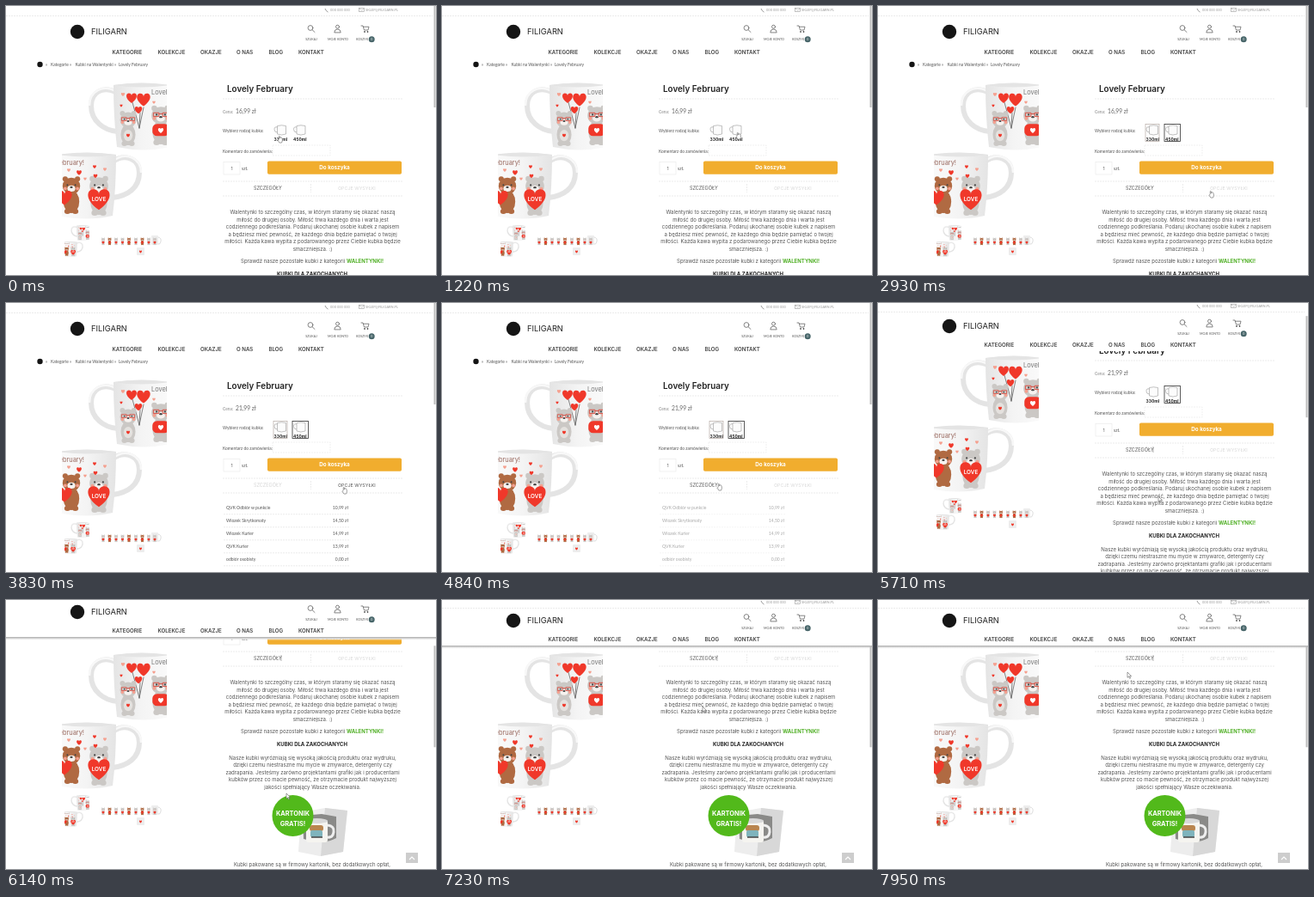
An HTML page that plays this animation: 500x313 px, repeating every 8 s.

```html
<!DOCTYPE html>
<html lang="pl">
<head>
<meta charset="utf-8">
<title>Sklep z kubkami</title>
<style>
html, body { margin: 0; width: 100%; height: 100%; overflow: hidden; background: #fff; }
svg { display: block; width: 500px; height: 313px; font-family: Inter, "Open Sans", sans-serif; }
.lato { font-family: Lato, "Open Sans", sans-serif; }
.dash { stroke: #e2e2e2; stroke-width: .7; stroke-dasharray: 2 1; }
.line { fill: none; stroke: #666; stroke-width: .8; stroke-linecap: round; stroke-linejoin: round; }
</style>
</head>
<body>
<svg id="stage" viewBox="0 0 500 313" xmlns="http://www.w3.org/2000/svg"></svg>
<script>
const LOOP = 8000;

// ---- drawing helpers ----
const text = (x, y, size, str, { fill = '#555', weight = 400, anchor = 'start', cls = '', id = '' } = {}) =>
  `<text x="${x}" y="${y}" font-size="${size}" fill="${fill}" font-weight="${weight}" text-anchor="${anchor}" class="${cls}" id="${id}">${str}</text>`;
const lato = (x, y, size, str, opts = {}) => text(x, y, size, str, { cls: 'lato', ...opts });
const mid = (x, y, size, str, opts = {}) => text(x, y, size, str, { anchor: 'middle', ...opts });
const rect = (x, y, w, h, fill, extra = '') => `<rect x="${x}" y="${y}" width="${w}" height="${h}" fill="${fill}" ${extra}/>`;
const dot = (x, y, r, fill) => `<circle cx="${x}" cy="${y}" r="${r}" fill="${fill}"/>`;
const oval = (x, y, rx, ry, fill) => `<ellipse cx="${x}" cy="${y}" rx="${rx}" ry="${ry}" fill="${fill}"/>`;
const path = (d, extra = 'class="line"') => `<path d="${d}" ${extra}/>`;
const dash = (x1, x2, y) => path(`M${x1} ${y}H${x2}`, 'class="dash"');
const group = (id, body, extra = '') => `<g id="${id}" ${extra}>${body}</g>`;

const RED = '#f0382a', PINK = '#f5a08f', GREY = '#cbc8c5', BROWN = '#b06a42';
const heart = (x, y, s, fill = RED) => path(
  'M0 .95C-1.35 0-1.05-.9-.5-.9C-.2-.9 0-.7 0-.45C0-.7 .2-.9 .5-.9C1.05-.9 1.35 0 0 .95Z',
  `fill="${fill}" transform="translate(${x} ${y}) scale(${s})"`);

// Bear standing on y = 0, about 44 units tall.
const bear = (x, y, s, fill, extra = '') => `<g transform="translate(${x} ${y}) scale(${s})">
  ${dot(-7, -39, 3, fill)}${dot(7, -39, 3, fill)}
  ${oval(-4.5, -2, 3.5, 3, fill)}${oval(4.5, -2, 3.5, 3, fill)}
  ${oval(0, -13, 9, 13, fill)}${oval(0, -31, 10, 9.5, fill)}
  ${oval(0, -28, 4.5, 3.5, '#f6f2ef')}${oval(0, -29.5, 1.6, 1.1, '#444')}
  ${dot(-4.5, -32, 1, '#444')}${dot(4.5, -32, 1, '#444')}
  ${dot(-7, -28, 1.8, PINK)}${dot(7, -28, 1.8, PINK)}${extra}</g>`;
const glasses = path('M-8-34h6v4h-6zM2-34h6v4H2zM-2-33H2', 'fill="none" stroke="#d94f43" stroke-width=".9"');

// ---- pieces ----
const mugs = () => group('mugs', `
  ${path('M129 101C112 92 99 101 99 116C99 134 114 145 130 146', 'fill="none" stroke="#e4e4e4" stroke-width="6"')}
  ${path('M129 100C112 90 97 100 97 116', 'fill="none" stroke="#f8f8f8" stroke-width="2.5"')}
  <g clip-path="url(#clipA)">
    ${path('M125 92Q157 87 190 92V164Q160 171 129 164Q125 130 125 92Z', 'fill="url(#shadeA)"')}
    ${path('M125 92Q157 87 190 92Q157 97 125 92Z', 'fill="#e4e4e4"')}
    ${text(169, 103, 7.4, 'Lovely', { fill: '#777' })}
    ${path('M155 142L147 112M155 142L160 118M155 142L156 124', 'class="line" stroke-width=".4"')}
    ${heart(146, 107, 6.2)}${heart(160, 109, 8)}${heart(154, 121, 4.5)}
    ${heart(136, 103, 2.2, PINK)}${heart(172, 112, 1.8, PINK)}${heart(134, 116, 1.6)}
    ${bear(142, 162, .95, GREY, glasses + oval(0, -12, 5.5, 7, '#e4e1de') + heart(0, -12, 2.2))}
    ${bear(180, 161, 1.08, GREY, glasses + rect(-9, -22, 18, 13, RED, 'rx="5"') + heart(0, -15, 3, '#fff'))}
  </g>
  ${path('M124 181C139 171 155 178 155 194C155 212 141 221 124 223', 'fill="none" stroke="#e4e4e4" stroke-width="6"')}
  ${path('M125 180C140 169 157 177 157 194', 'fill="none" stroke="#f8f8f8" stroke-width="2.5"')}
  <g clip-path="url(#clipB)">
    ${path('M60 173Q94 168 128 173Q128 212 124 244Q94 251 60 244Z', 'fill="url(#shadeB)"')}
    ${path('M60 173Q94 168 128 173Q94 178 60 173Z', 'fill="#e4e4e4"')}
    ${text(91, 185, 7.4, 'February!', { fill: '#9a6a60', anchor: 'end' })}
    ${heart(85, 194, 3)}${heart(73, 191, 2, PINK)}${heart(103, 187, 2)}${heart(115, 190, 2, PINK)}${heart(92, 201, 1.8, PINK)}
    ${bear(76, 241, 1.02, BROWN)}${heart(68, 223, 9)}
    ${bear(108, 243, 1.08, GREY)}${heart(104, 198, 2.4)}
    ${heart(108, 225, 13)}${mid(108, 227, 6.4, 'LOVE', { fill: '#fff', weight: 600 })}
  </g>`);

const strip = (x, y, n) => Array.from({ length: n }, (_, i) =>
  bear(x + i * 7.5, y, .2, i % 3 === 1 ? BROWN : GREY, heart(0, -14, 8))).join('');

const gallery = () => group('gallery', `${mugs()}
  <use href="#mugs" transform="translate(68 255) scale(.235) translate(-65 -90)"/>
  ${strip(113, 278, 5)}${strip(151, 278, 3)}
  ${rect(169, 267, 8, 11, '#ededed', 'rx="1"')}${path('M177 269q4 1 3 5t-3 3', 'fill="none" stroke="#ddd"')}
  ${bear(173, 278, .2, GREY, heart(0, -14, 8))}
  ${rect(152, 281, 9, 9, '#ededed', 'rx="1"')}${heart(156.5, 286, 1.6)}`);

const sizeIcon = (x, label) =>
  path(`M${x + 5} 139.5Q${x + 10} 138 ${x + 15} 139.5V149Q${x + 10} 151 ${x + 5} 149ZM${x + 5} 141Q${x + 1.5} 140 ${x + 1.5} 143.5T${x + 5} 147`,
    'fill="#fcfcfc" stroke="#999" stroke-width=".6"') +
  mid(x + 8.8, 157.2, 4.9, label, { fill: '#222', weight: 700 });

const product = () => `
  ${dot(39.5, 68, 3.2, '#151515')}
  ${lato(46, 70, 4.8, '»')}${lato(52, 70, 4.9, 'Kategorie »')}
  ${lato(80.5, 70, 4.9, 'Kubki na Walentynki »')}${lato(131, 70, 4.9, 'Lovely February')}
  ${text(257, 99.5, 9.9, 'Lovely February', { fill: '#222', weight: 600 })}
  ${dash(252, 461, 108)}
  ${lato(252, 125, 4.9, 'Cena:', { fill: '#888' })}${lato(267, 125.3, 6.7, '', { id: 'price', fill: '#666' })}
  ${lato(252, 146.5, 4.9, 'Wybierz rodzaj kubka:')}
  ${sizeIcon(310.5, '330ml')}${sizeIcon(333, '450ml')}
  ${rect(311, 137.5, 16, 20, 'none', 'id="box330" stroke="#b5aaa4" stroke-width=".7"')}
  ${rect(333, 137.5, 18.5, 20, 'none', 'id="box450" stroke="#333" stroke-width=".8"')}
  ${lato(252, 170.5, 4.9, 'Komentarz do zamówienia:')}
  ${rect(310, 162, 67, 12, 'none', 'class="dash" opacity=".7"')}
  ${rect(253, 181.5, 19, 14.5, '#fff', 'stroke="#e8e8e8" stroke-width=".6"')}
  ${mid(262.5, 190.8, 5.2, '1')}${lato(274, 190.6, 5, 'szt.')}
  ${rect(304, 180.5, 156, 15.2, '#f1ad2e', 'rx="1.8"')}
  ${mid(382, 190.4, 6.3, 'Do koszyka', { fill: '#fff', weight: 700 })}
  ${text(288, 214, 5.5, 'SZCZEGÓŁY', { id: 'tabInfo' })}${text(386, 214, 5.4, 'OPCJE WYSYŁKI', { id: 'tabShip' })}
  ${path('M320 208V215', 'id="caret" stroke="#888" stroke-width=".6"')}
  ${path('M354.5 207V217', 'class="dash"')}${dash(252, 461, 204)}${dash(252, 461, 221)}`;

const intro = [
  'Walentynki to szczególny czas, w którym staramy się okazać naszą',
  'miłość do drugiej osoby. Miłość trwa każdego dnia i warta jest',
  'codziennego podkreślania. Podaruj ukochanej osobie kubek z napisem',
  'a będziesz mieć pewność, że każdego dnia będzie pamiętać o twojej',
  'miłości. Każda kawa wypita z podarowanego przez Ciebie kubka będzie',
  'smaczniejsza. :)'];
const quality = [
  'Nasze kubki wyróżniają się wysoką jakością produktu oraz wydruku,',
  'dzięki czemu niestraszne mu mycie w zmywarce, detergenty czy',
  'zadrapania. Jesteśmy zarówno projektantami grafiki jak i producentami',
  'kubków przez co macie pewność, że otrzymacie produkt najwyższej',
  'jakości spełniający Wasze oczekiwania.'];
const para = (lines, y) => lines.map((s, i) => mid(356.5, y + i * 8.55, 6.03, s)).join('');

const giftBox = () => `
  ${path('M343 391L371 386L397 389L392 437L365 442L340 437Z', 'fill="#ededed"')}
  ${path('M371 386L397 389L392 437L366 442Z', 'fill="#d8d8d8"')}
  ${path('M345 395L367 393L384 396V421Q371 429 346 422Z', 'fill="#8a8a88"')}
  ${rect(349, 400, 25, 26, '#f5f4f0', 'rx="3"')}
  ${oval(361.5, 401, 12.5, 3, '#d8d8d8')}
  ${rect(353, 406, 16, 7, '#b9854f', 'rx="3"')}${rect(354, 412, 14, 8, '#7fb4bd', 'rx="2"')}
  ${path('M355 420H368', 'stroke="#444" stroke-width="1.5"')}
  ${path('M374 406q8 1 7 8t-7 6', 'fill="none" stroke="#eee" stroke-width="3"')}
  ${dot(333.5, 395, 24, '#52b91b')}
  ${mid(333.5, 395, 7.4, 'KARTONIK', { fill: '#fff', weight: 700 })}
  ${mid(333.5, 406.5, 7.4, 'GRATIS!', { fill: '#fff', weight: 700 })}`;

const details = () => group('details', `${para(intro, 242)}
  ${mid(356, 299, 6.03, 'Sprawdź nasze pozostałe kubki z kategorii <tspan fill="#52b028" font-weight="700">WALENTYNKI!</tspan>')}
  ${mid(356, 314.2, 6, 'KUBKI DLA ZAKOCHANYCH', { fill: '#222', weight: 700 })}
  ${para(quality, 329.6)}${giftBox()}
  ${mid(356, 454.3, 6.03, 'Kubki pakowane są w firmowy kartonik, bez dodatkowych opłat,')}`);

const couriers = [['QVK Odbiór w punkcie', '10,99'], ['Wiozek Skrytkomaty', '14,50'],
  ['Wiozek Kurier', '14,99'], ['QVK Kurier', '13,99'], ['odbiór osobisty', '0,00']];
const shipping = () => group('shipping', couriers.map(([name, cost], i) => {
  const y = 239.8 + i * 15;
  return lato(256, y, 5.1, name) + lato(398, y, 5.1, cost + ' zł', { anchor: 'end' }) + dash(253, 400, y + 6);
}).join(''));

const menu = [[123.5, 'KATEGORIE'], [176.5, 'KOLEKCJE'], [226, 'OKAZJE'], [268, 'O NAS'], [305.5, 'BLOG'], [340, 'KONTAKT']];
const header = () => `
  ${rect(0, 0, 500, 4, 'url(#shadow)', 'id="shade"')}${rect(0, 0, 500, 61, '#fff', 'id="bar"')}
  ${group('contact', `${dash(0, 496, 11.5)}
    ${path('M371 3q1 3 3.5 4', 'fill="none" stroke="#999" stroke-width="1"')}
    ${lato(377, 6, 4, '000 000 000', { fill: '#999' })}
    ${rect(410.5, 2.5, 6, 4, 'none', 'stroke="#999" stroke-width=".6"')}${path('M411 3l2.7 2l2.7-2', 'fill="none" stroke="#999" stroke-width=".5"')}
    ${lato(418, 6, 4, 'SKLEP@FILIGARN.PL', { fill: '#999' })}`)}
  ${group('brand', `${dot(83, 30, 8.2, '#151515')}${text(99, 33.4, 9.3, 'FILIGARN', { fill: '#222' })}
    <circle class="line" cx="354" cy="25.5" r="2.9"/>${path('M356.2 27.8L359 30.5')}
    <circle class="line" cx="385.5" cy="24.2" r="2"/>${path('M381.8 30.5Q381.8 27 385.5 27T389.2 30.5Z')}
    ${path('M413 23H415L416.5 28H421L422 24.2H415.5')}${dot(417, 30, .9, '#555')}${dot(420.5, 30, .9, '#555')}
    ${mid(355, 40.4, 3.7, 'SZUKAJ', { cls: 'lato' })}${mid(386, 40.4, 3.7, 'MOJE KONTO', { cls: 'lato' })}
    ${mid(414, 40.2, 3.7, 'KOSZYK', { cls: 'lato' })}${dot(425.2, 38.8, 3.5, '#48666a')}${mid(425.2, 40.4, 4, '0', { fill: '#fff' })}`)}
  ${group('menu', menu.map(([x, s]) => text(x, 56.3, 6.15, s, { fill: '#444', weight: 600 })).join(''))}`;

const grad = (id, colors, dir = '') => `<linearGradient id="${id}" ${dir}>${colors.map((c, i) =>
  `<stop offset="${i / (colors.length - 1)}" stop-color="${c}"/>`).join('')}</linearGradient>`;

stage.innerHTML = `<defs>
  ${grad('shadeA', ['#e4e4e4', '#f4f4f4', '#fafafa'])}${grad('shadeB', ['#fafafa', '#f4f4f4', '#e4e4e4'])}
  ${grad('shadow', ['#aaa', '#ddd', '#fff0'], 'x2="0" y2="1"')}
  <clipPath id="clipA">${rect(96, 88, 91, 82, '#000')}</clipPath>
  <clipPath id="clipB">${rect(65, 168, 93, 82, '#000')}</clipPath></defs>
  ${group('page', product() + details() + shipping())}${gallery()}${header()}
  ${rect(497.5, 0, 2, 118, '#bdbdbd', 'id="thumb"')}
  ${group('toTop', rect(465, 294, 14, 12, '#cdcdcd') + path('M469 302l3-3l3 3', 'fill="none" stroke="#fff" stroke-width="1.1"'))}
  ${path('M0 0V9L2.2 7L3.8 10.5L5.2 9.8L3.7 6.5H6.6Z', 'id="arrow" fill="#fff" stroke="#555" stroke-width=".8"')}
  ${path('M1.8 6V1Q2.6-.4 3.4 1V4.2Q6-.2 7.6 5.5V8.5L6.5 11.5H2.8L0 7.6Q.2 5.8 1.8 7.4', 'id="hand" fill="#fff" stroke="#555" stroke-width=".8"')}`;

// ---- timeline: each row holds until the next ----
const hold = (rows, t) => rows.findLast(r => r[0] <= t);

const cursorAt = [ // time, x, y, hand
  [0, 316, 151, 1], [100, 315, 150, 1], [920, 320, 149, 1], [1020, 328, 148], [1120, 336, 147], [1220, 342, 147, 1],
  [1620, 342, 146, 1], [2230, 351, 151], [2330, 361, 152], [2630, 364, 154], [2730, 371, 168], [2830, 379, 191],
  [2930, 385, 215, 1], [3030, 386, 215, 1], [3230, 391, 214, 1], [4240, 382, 216], [4340, 364, 217], [4440, 345, 217],
  [4540, 330, 214], [4640, 320, 210, 1], [5110, 322, 215], [5210, 324, 220], [5310, 326, 225],
  [6640, 326, 222], [6740, 324, 212], [6840, 320, 194], [6940, 315, 172], [7040, 309, 148], [7140, 303, 124],
  [7240, 297, 104], [7340, 293, 91], [7430, 290, 83], [7750, 289, 82], [7850, 289, 83], [7950, 290, 84]];
const scrollAt = [[0, 0], [5610, 14], [5710, 41], [5810, 75], [5910, 105], [6040, 130], [6140, 144]];
const headerAt = [[0, 0], [5610, -1], [5710, -3], [5810, -7], [5910, -11], [6040, -14], [6140, -16], [6640, -14], [6740, -10], [6840, -6]];
const tabAt = [ // time, details opacity, shipping opacity
  [0, 1, 0], [3430, .4, 0], [3530, 0, 0], [3630, 0, .4], [3730, 0, .8], [3830, 0, 1],
  [4840, 0, .5], [4940, .1, 0], [5040, .5, 0], [5140, .8, 0], [5240, 1, 0]];

const $ = id => document.getElementById(id);
const set = (id, attrs) => { for (const k in attrs) $(id).setAttribute(k, attrs[k]); };
const move = (id, x, y, scale = 1) => set(id, { transform: `translate(${x} ${y}) scale(${scale})` });
const show = (id, on) => set(id, { opacity: +on });

function draw(t) {
  const [, x, y, hand] = hold(cursorAt, t);
  const scroll = hold(scrollAt, t)[1], lift = hold(headerAt, t)[1];
  const [, info, ship] = hold(tabAt, t);
  const onShip = t >= 3430 && t < 4840, stuck = scroll > 0;

  $('price').textContent = t < 3430 ? '16,99 zł' : '21,99 zł';
  show('box330', t >= 1820 && !stuck);
  show('box450', t >= 1820);
  show('details', info);
  show('shipping', ship);
  set('tabInfo', { fill: onShip ? '#d4d4d4' : '#555' });
  set('tabShip', { fill: onShip ? '#555' : '#d8d8d8' });
  show('caret', stuck);

  move('page', 0, -scroll);
  move('gallery', 0, -Math.min(scroll, 28));
  const menuLift = lift - (stuck ? 2 : 0);
  move('brand', 0, lift);
  move('menu', 0, menuLift);
  move('contact', 0, lift / 3);
  show('contact', lift > -12);
  set('bar', { height: 61 + menuLift });
  move('shade', 0, 61 + menuLift);
  show('shade', scroll > 50);
  move('thumb', 0, scroll * .37);
  show('toTop', scroll > 100);

  show('arrow', !hand);
  show('hand', !!hand);
  move(hand ? 'hand' : 'arrow', x, y, .7);
}

const start = performance.now();
function tick(now) {
  draw(Math.max(0, now - start) % LOOP);
  requestAnimationFrame(tick);
}
draw(0);
requestAnimationFrame(tick);
</script>
</body>
</html>
```
